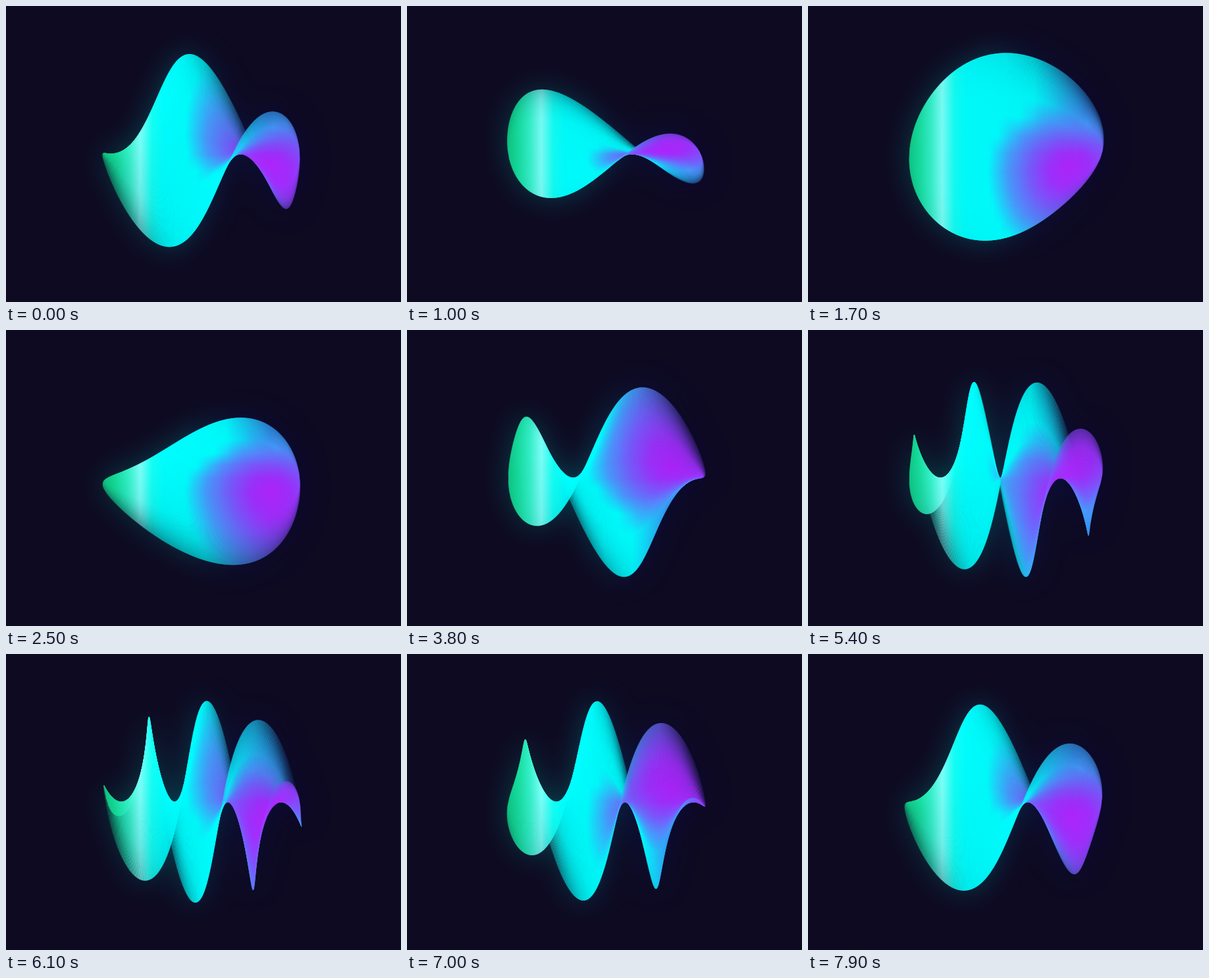
Recreate the animation shown at these times as an HTML page with a canvas. Size 600 by 450 pixels, loop 8000 ms.

```html
<!DOCTYPE html>
<html>
<head>
<meta charset="utf-8">
<style>
  html, body { margin: 0; height: 100%; overflow: hidden; background: #0e0a22; }
  canvas { display: block; }
</style>
</head>
<body>
<canvas id="stage" width="600" height="450"></canvas>
<script>
// A disc twisted around its horizontal axis, seen in perspective.
const W = 600, H = 450, CX = 300, CY = 225, R = 146, DEPTH = 470, LOOP = 8;
const ctx = document.getElementById('stage').getContext('2d');

const layer = () => {
  const c = document.createElement('canvas');
  c.width = W;
  c.height = H;
  return c.getContext('2d');
};
const sheet = layer(), glow = layer();

// [seconds, twist per pixel, angle at the centre]
const keys = [
  [0, .0159, 2.24], [1, .0057, -.24], [2.5, .0037, -2.43], [3.8, .016, -5.52],
  [4.7, .0257, -7.6], [6.1, .0388, -10.86], [7.9, .0172, -16.29]
];

function key(i) {
  const turn = Math.floor(i / keys.length);
  const [t, k, a] = keys[i - turn * keys.length];
  return [t + turn * LOOP, k, a - turn * 6 * Math.PI];
}

// Smooth periodic curve through the keys
function pose(t) {
  let i = 0;
  while (key(i + 1)[0] <= t) i++;
  const [p, q, r, s] = [-1, 0, 1, 2].map(n => key(i + n));
  const d = r[0] - q[0], f = (t - q[0]) / d;
  return [1, 2].map(c => {
    const m = (r[c] - p[c]) / (r[0] - p[0]) * d;
    const n = (s[c] - q[c]) / (s[0] - q[0]) * d;
    const e = r[c] - q[c];
    return q[c] + f * (m + f * (3 * e - 2 * m - n + f * (m + n - 2 * e)));
  });
}

const clamp = v => Math.max(0, Math.min(1, v));
const mix = (a, b, f) => a.map((v, i) => v + (b[i] - v) * f);

const cyan = [0, 255, 255], azure = [50, 150, 240];
const violets = [[178, 36, 255], [160, 48, 255], [118, 94, 255], [72, 155, 255]];

// Colour of the disc at x along the axis and w across it
function shade(x, w) {
  const base = mix(cyan, azure, clamp((x - 40) / 70));
  const dw = w + 22;
  const d = Math.hypot(x - 100, dw * (dw > 0 ? 1.25 : .7)) / 32;
  const ramp = [...violets, base, base];
  const i = Math.min(4, Math.floor(d));
  return mix(ramp[i], ramp[i + 1], clamp(d - i));
}

function across(stops) {
  const g = ctx.createLinearGradient(148, 0, 452, 0);
  stops.forEach(([x, color]) => g.addColorStop((x - 148) / 304, color));
  return g;
}
const leftHues = across([
  [148, '#0cc07c'], [168, '#16dc9c'], [186, '#32f0c8'], [204, '#7cfff8'],
  [222, '#14fff4'], [240, 'rgba(0,255,255,.8)'], [275, 'rgba(0,255,255,0)']
]);
const halo = across([[148, '#007468'], [270, '#007880'], [350, '#081a5c'], [452, '#04004a']]);

function tint(c, mode, paint) {
  c.globalCompositeOperation = mode;
  c.fillStyle = paint;
  c.fillRect(0, 0, W, H);
}

function reset(c) {
  c.globalCompositeOperation = 'source-over';
  c.clearRect(0, 0, W, H);
}

function project(x, y, z) {
  const p = DEPTH / (DEPTH - z);
  return [CX + x * p, CY + y * p];
}

function drawSheet(t) {
  const [twist, angle] = pose(t);
  const body = .8, steps = 10;
  reset(sheet);
  sheet.lineWidth = 1.1;
  for (let x = -R; x <= R; x += .4) {
    const h = Math.sqrt(R * R - x * x);
    const u = angle + twist * x;
    const c = Math.cos(u), y = h * Math.sin(u), z = h * c;
    const a = project(x, y, z), b = project(x, -y, -z);
    const g = sheet.createLinearGradient(...a, ...b);
    for (let i = 0; i <= steps; i++) {
      const m = i / steps, s = 1 - 2 * m;
      const far = m * (DEPTH + z);
      // The rim is thinner towards the eye and towards the right
      const rim = Math.max(.12, .75 - .45 * Math.max(0, c * s) - .4 * Math.max(0, x / R));
      const alpha = rim + (body - rim) * clamp((1 - Math.abs(s)) / .44);
      g.addColorStop(far / ((1 - m) * (DEPTH - z) + far), `rgba(${shade(x, s * h)},${alpha})`);
    }
    sheet.strokeStyle = g;
    sheet.beginPath();
    sheet.moveTo(...a);
    sheet.lineTo(...b);
    sheet.stroke();
  }
  tint(sheet, 'source-atop', leftHues);
}

function draw(t) {
  drawSheet(t);

  reset(glow);
  glow.filter = 'blur(22px)';
  glow.drawImage(sheet.canvas, 0, 0);
  glow.filter = 'none';
  tint(glow, 'source-in', halo);

  ctx.fillStyle = '#0e0a22';
  ctx.fillRect(0, 0, W, H);
  ctx.globalAlpha = .5;
  ctx.drawImage(glow.canvas, 0, 0);
  ctx.globalAlpha = 1;
  ctx.drawImage(sheet.canvas, 0, 0);
}

// The picture steps ten times a second
let last = -1;
const begin = performance.now();
function tick() {
  const step = Math.floor((performance.now() - begin) / 100) % (LOOP * 10);
  if (step !== last) draw((last = step) / 10);
  requestAnimationFrame(tick);
}
tick();
</script>
</body>
</html>
```
